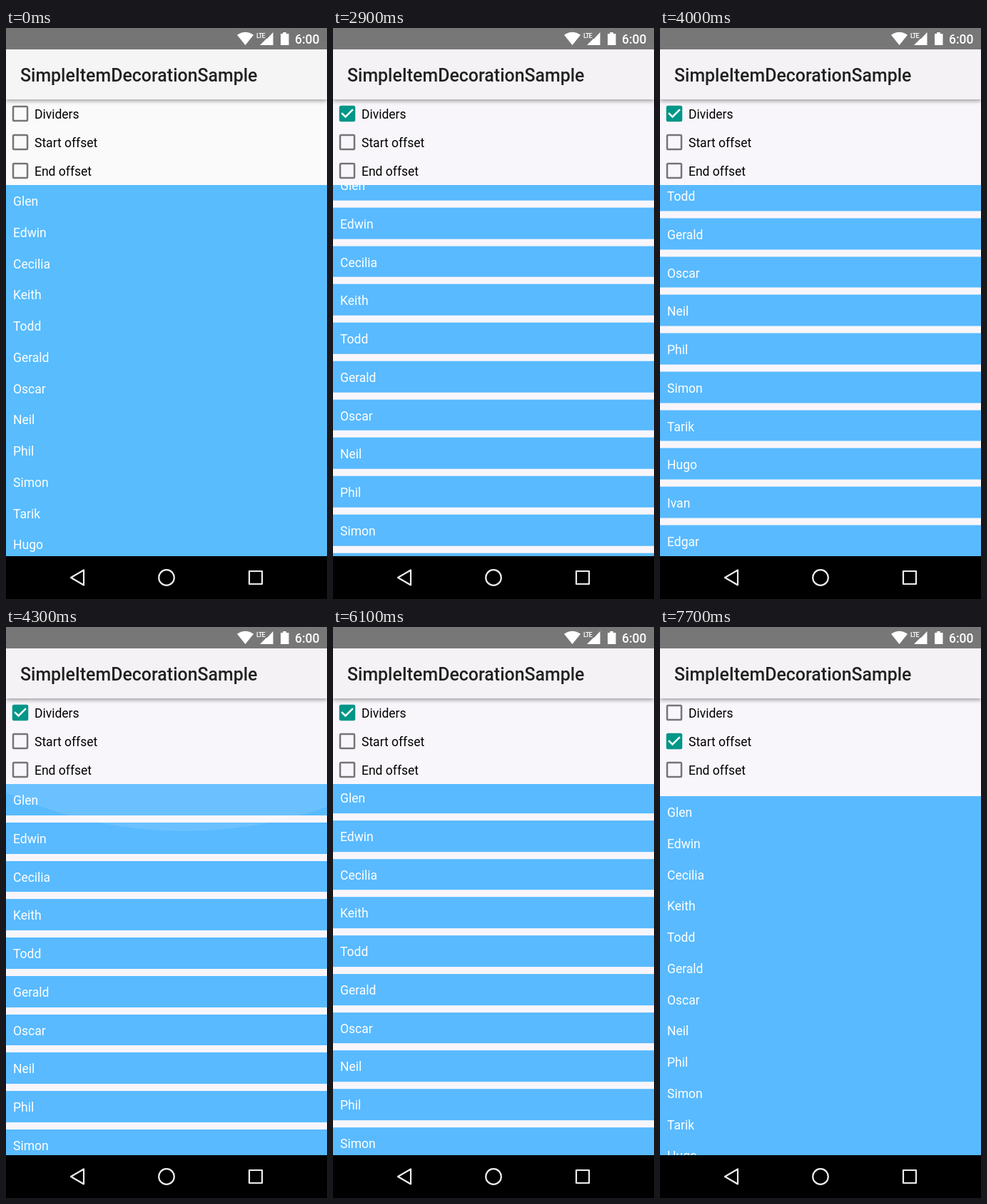
Animation, 450 px wide and 800 px high, one loop 8000 ms. Source, as an HTML page:

```html
<!DOCTYPE html>
<html lang="en">
<head>
<meta charset="utf-8">
<title>SimpleItemDecorationSample</title>
<style>
@property --on { syntax: "<number>"; inherits: true; initial-value: 0; }

html, body { margin: 0; width: 100%; height: 100%; overflow: hidden; }
body {
  --bg: #fafafa; --bar: #f5f5f5; --blue: #58bcfd; --status: #757575;
  position: relative;
  font: 17.5px Roboto, sans-serif;
  animation: tint 8s step-end infinite;
}
.screen { position: absolute; inset: 0; width: 450px; height: 800px; overflow: hidden; background: var(--bg); }
.screen > * { position: absolute; left: 0; width: 450px; }

.status { top: 0; height: 30px; background: var(--status); }
.status text { fill: #fff; font-weight: 500; }
.status .net { font-size: 9px; letter-spacing: -1px; }

.appbar {
  top: 30px; height: 70px; box-sizing: border-box; padding-left: 20px;
  font-size: 24.9px; font-weight: 500; line-height: 73px; color: #212121;
  background: var(--bar); box-shadow: 0 2px 6px rgba(0, 0, 0, .4);
}
.nav { top: 740px; height: 60px; background: #000; }

.options { top: 100px; }
.option { position: relative; height: 40px; padding-left: 40px; line-height: 43px; color: #000; }
.option svg { position: absolute; left: 8px; top: 8px; color: #757575; }
.hole, .tick { transform-box: fill-box; transform-origin: center; }
.hole { fill: var(--bg); transform: scale(calc(1 - min(1, var(--on) * 2))); }
.tick { fill: none; stroke: #fff; stroke-width: 2.5; transform: scale(max(0, var(--on) * 2 - 1)); }
.dividers svg { animation: dividers 8s linear infinite; }
.start svg { animation: start 8s linear infinite; }

.view { top: 220px; height: 520px; overflow: hidden; }
.list {
  display: flex; flex-direction: column; margin: 0; padding: 0; list-style: none;
  animation: layout 8s step-end infinite, scroll 8s linear infinite;
}
.list li { flex: none; height: 43.75px; padding-left: 10px; line-height: 47px; color: #fff; background: var(--blue); }
.view svg { position: absolute; inset: 0; }
.glow { fill: #fff; fill-opacity: .11; opacity: 0; }
.top { animation: top 8s linear infinite; }
.bottom { animation: bottom 8s linear infinite; }

@keyframes tint {
  0% { --bg: #fafafa; --bar: #f5f5f5; --blue: #58bcfd; --status: #757575; }
  28.75%, 100% { --bg: #f9f6fb; --bar: #f4f2f5; --blue: #59baff; --status: #777; }
}
@keyframes layout {
  0% { gap: 0; padding-top: 0; }
  24.375% { gap: 10px; padding-top: 0; }
  80% { gap: 0; padding-top: 0; }
  90.625%, 100% { gap: 0; padding-top: 17px; }
}
@keyframes scroll {
  0%, 34.375% { translate: 0 0; }
  36.25% { translate: 0 -21.6px; }
  37.5% { translate: 0 -95px; }
  38.75% { translate: 0 -185px; }
  39.375%, 51.25% { translate: 0 -222.5px; }
  53.25%, 62.5% { translate: 0 0; }
  64.375% { translate: 0 -60px; }
  66.25%, 73.125% { translate: 0 -222.5px; }
  75% { translate: 0 -90px; }
  76.25% { translate: 0 -3px; }
  76.5%, 100% { translate: 0 0; }
}
@keyframes dividers {
  0%, 24.374% { --on: 0; color: #757575; }
  24.375%, 25.1% { --on: 0; color: #009688; }
  28.1%, 80% { --on: 1; color: #009688; }
  80.001% { --on: 1; color: #757575; }
  83.5%, 100% { --on: 0; color: #757575; }
}
@keyframes start {
  0%, 90.624% { --on: 0; color: #757575; }
  90.625%, 91.35% { --on: 0; color: #009688; }
  94.35%, 100% { --on: 1; color: #009688; }
}
@keyframes top {
  0%, 53.25% { opacity: 0; }
  53.6%, 55% { opacity: 1; }
  62%, 76.5% { opacity: 0; }
  77.1%, 78% { opacity: 1; }
  83.5%, 100% { opacity: 0; }
}
@keyframes bottom {
  0%, 39.375% { opacity: 0; }
  39.8%, 41.25% { opacity: 1; }
  49.5%, 66.25% { opacity: 0; }
  67%, 68% { opacity: 1; }
  73%, 100% { opacity: 0; }
}
</style>
</head>
<body>
<div class="screen">
  <div class="view">
    <ul class="list"></ul>
    <svg width="450" height="520">
      <circle class="glow top" cx="250" cy="-540" r="606"/>
      <circle class="glow bottom" cx="280" cy="1069" r="606"/>
    </svg>
  </div>

  <div class="options"></div>
  <div class="appbar">SimpleItemDecorationSample</div>

  <svg class="status" width="450" height="30" fill="#fff">
    <path d="M335.5 24 324 9.8Q335.5 1.5 347 9.8Z"/>
    <text class="net" x="351" y="14">LTE</text>
    <path d="M356 24 365 15H366L374.5 6V24Z"/>
    <path d="M385 8h3.2V6h4.6v2H396.5V24H385Z"/>
    <text x="405" y="22">6:00</text>
  </svg>

  <svg class="nav" width="450" height="60" fill="none" stroke="#eee" stroke-width="2.2" stroke-linejoin="round">
    <path d="M91 30 109 19.5V40.5Z"/>
    <circle cx="225" cy="30" r="10.8"/>
    <rect x="341" y="21" width="18" height="18"/>
  </svg>
</div>

<script>
const names = ["Glen", "Edwin", "Cecilia", "Keith", "Todd", "Gerald", "Oscar",
  "Neil", "Phil", "Simon", "Tarik", "Hugo", "Ivan", "Edgar"];
const options = [["dividers", "Dividers"], ["start", "Start offset"], ["end", "End offset"]];

const box = `<svg width="24" height="24">
  <rect x=".75" y=".75" width="22.5" height="22.5" rx="2.5" fill="currentColor"/>
  <rect class="hole" x="3.25" y="3.25" width="17.5" height="17.5"/>
  <path class="tick" d="M4.1 11.1 9.5 16.5 19.9 6.1"/>
</svg>`;

document.querySelector(".list").innerHTML = names.map(n => `<li>${n}</li>`).join("");
document.querySelector(".options").innerHTML = options
  .map(([id, label]) => `<div class="option ${id}">${box}${label}</div>`).join("");
</script>
</body>
</html>
```
